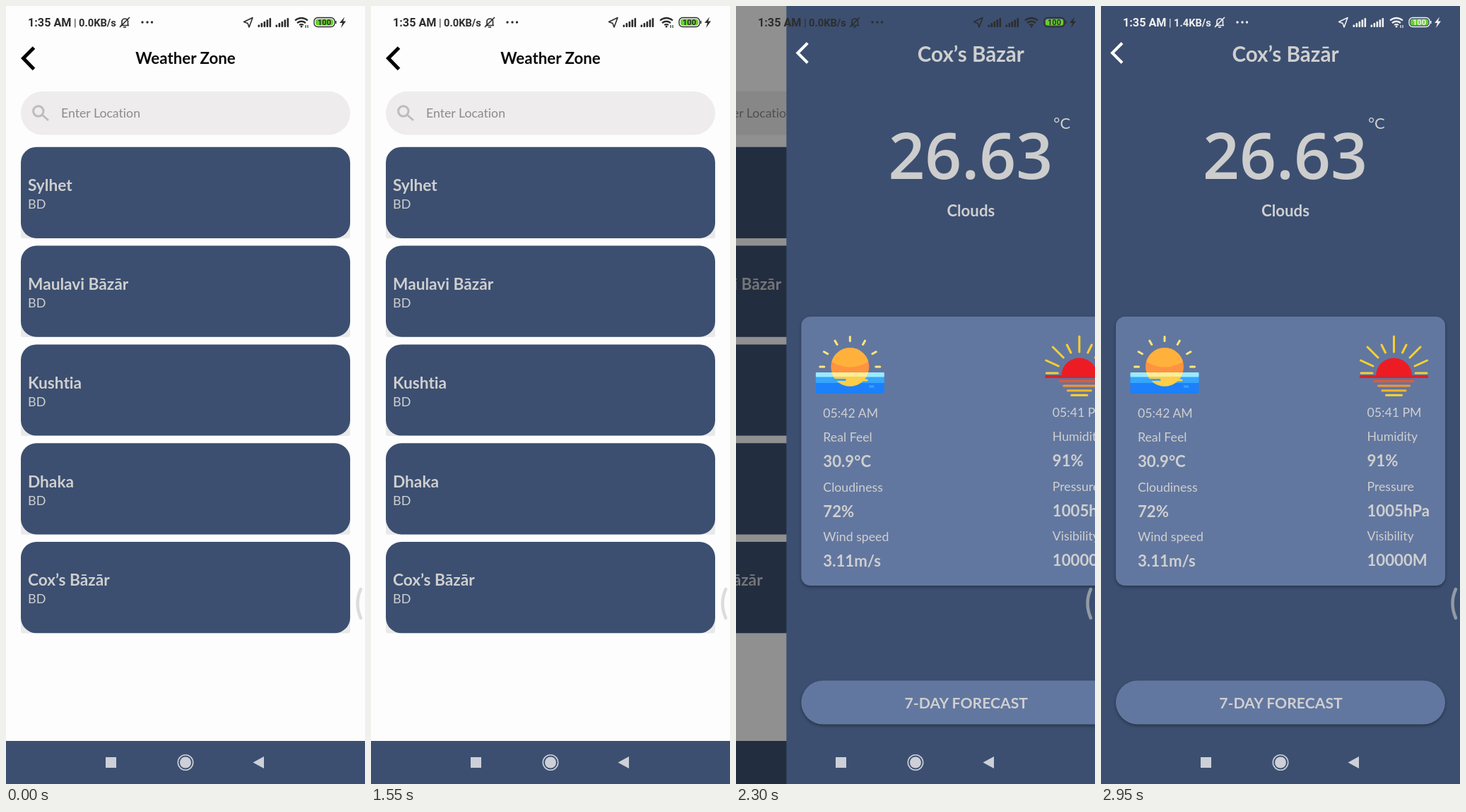
An HTML page for the animation above (3000 ms loop, 508 by 1102 pixels).

```html
<!DOCTYPE html>
<html lang="en">
<head>
<meta charset="utf-8">
<title>Weather</title>
<style>
html, body { margin: 0; width: 100%; height: 100%; overflow: hidden; background: #3c4f70; }
svg { display: block; width: 508px; height: 1102px; font-family: Lato, "Noto Sans", sans-serif; }
text { white-space: pre; font-variant-ligatures: none; }
.raised { filter: drop-shadow(0 2px 2px rgba(0, 0, 0, .35)); }
.status text { font-family: Roboto, sans-serif; }
</style>
</head>
<body>
<svg id="stage" viewBox="0 0 508 1102"></svg>
<script>
const LOOP = 3000, WIDTH = 508, NAVY = '#3c4f70', PANEL = '#62779f', PALE = '#cfcfd0';
const stage = document.getElementById('stage');

const text = (x, y, size, str, fill = PALE, weight = 400, extra = '') =>
  `<text x="${x}" y="${y}" font-size="${size}" fill="${fill}" font-weight="${weight}" ${extra}>${str}</text>`;
const rect = (x, y, w, h, fill, r = 0, extra = '') =>
  `<rect x="${x}" y="${y}" width="${w}" height="${h}" rx="${r}" fill="${fill}" ${extra}/>`;
const stroke = (d, color, width, extra = '') =>
  `<path d="${d}" fill="none" stroke="${color}" stroke-width="${width}" ${extra}/>`;
const middle = 'text-anchor="middle"', round = 'stroke-linecap="round"';

function listPage() {
  const cities = ['Sylhet', 'Maulavi Bāzār', 'Kushtia', 'Dhaka', 'Cox’s Bāzār'];
  const cards = cities.map((city, i) => {
    const y = 199.7 + i * 139.85;
    return rect(21, y + 95, 466, 34.5, '#e9e9ea', 3) + rect(21, y, 466, 129.2, NAVY, 22) +
      text(31, y + 62.3, 22.7, city, PALE, 700) + text(31, y + 87.3, 18, 'BD');
  });
  return rect(0, 0, WIDTH, 1102, '#fdfdfd') + rect(0, 1041, WIDTH, 61, NAVY) +
    stroke('M39.5 59 24.5 74 39.5 89.5', '#000', 5) +
    text(254, 82, 22.3, 'Weather Zone', '#0a0a0a', 700, middle) +
    rect(21, 121, 466, 61.5, '#eeecec', 30.7) +
    stroke('M53 149a7.2 7.2 0 1 1-14.4 0a7.2 7.2 0 1 1 14.4 0M51 154 60 162', '#bebcbc', 3) +
    text(78, 158, 17.7, 'Enter Location', '#8c8a8a') + cards.join('');
}

function sunrise() {
  let rays = '';
  for (let a = 0; a <= 180; a += 30) {
    const c = Math.cos(a * Math.PI / 180), s = Math.sin(a * Math.PI / 180);
    rays += `M${90 + 36.5 * c} ${511 - 36.5 * s}L${90 + 42.5 * c} ${511 - 42.5 * s}`;
  }
  return stroke(rays, '#ffe77c', 3, round) +
    '<circle cx="90" cy="511" r="27" fill="#ff9340"/>' +
    '<path d="M64 504a27 27 0 0 1 52 0q-26 15-52 0" fill="#ffb13c"/>' +
    rect(41.5, 519, 97, 30, '#1c80fa', 2) + rect(41.5, 525, 97, 9, '#36a5fb') +
    rect(41.5, 519, 97, 6.5, '#9aeaff', 1) +
    '<path d="M64 519h52a27 27 0 0 1-52 0" fill="#ffce48"/>' +
    '<path d="M64 519h52l-2.5 6h-47z" fill="#f8ee9c"/>' +
    stroke('M66 529.5H83', '#36a5fb', 3, round) +
    stroke('M97 530H114', '#ffce48', 3, round) +
    stroke('M117 539H124', '#36a5fb', 3);
}

function sunset() {
  const ripples = ['#f4562b', '#fb9330', '#fdb52d', '#fdd42f'];
  return stroke('M414.5 468V490M397 480 402.5 491M432 480 426.5 491M377 483 392 498M452 483 437 498' +
      'M367.5 502 385 510M461.5 502 444 510M368 520H384M445 520H461', '#fbd02d', 3, round) +
    '<path d="M389 524a25.5 25.5 0 0 1 51 0z" fill="#ed1c24"/>' +
    rect(366, 523, 97, 4, '#d9232c', 1) +
    ripples.map((c, i) => rect(385.5 + i * 5.5, 530 + i * 6.6, 58 - i * 11, 3, c, 1.5)).join('');
}

function detailContent() {
  const column = (x, y, rows) => rows.map((row, i) => {
    const bold = i > 0 && i % 2 === 0;
    return text(x, y + i * 35.2 - (i % 2), bold ? 22.2 : 17.7, row, PALE, bold ? 700 : 400);
  }).join('');
  return stroke('M30 52.5 16 66.5 30 80.5', '#fff', 4) +
    text(261, 79, 29.6, 'Cox’s Bāzār', PALE, 700, middle) +
    text(260.5, 245, 91, '26.63', '#cdcdcd', 600, middle + ' font-family="Open Sans, sans-serif"') +
    text(378, 174, 22, '°C') + text(261, 298, 22.2, 'Clouds', PALE, 700, middle) +
    rect(21, 440, 466, 381, PANEL, 13, 'class="raised"') + sunrise() + sunset() +
    column(52, 583, ['05:42 AM', 'Real Feel', '30.9°C', 'Cloudiness', '72%', 'Wind speed', '3.11m/s']) +
    column(376.5, 582, ['05:41 PM', 'Humidity', '91%', 'Pressure', '1005hPa', 'Visibility', '10000M']) +
    rect(21, 955.5, 466, 62, PANEL, 31, 'class="raised"') +
    text(254.5, 995, 21.2, '7-DAY FORECAST', PALE, 700, middle);
}

function statusBar() {
  const tint = 'currentColor';
  const signal = x => [0, 1, 2, 3, 4].map(i =>
    rect(x + i * 4, 26.5 - i * 2.4, 2.6, 3.5 + i * 2.4, tint, 1)).join('');
  return '<g id="status" class="status">' +
    text(31, 29, 16.2, '1:35 AM', tint, 600) + text(96, 29, 14.7, '|', tint) +
    text(103, 29, 14.7, '<tspan id="speed"></tspan>', tint, 600) +
    stroke('M162 27.5H174M164 27V21a4.5 4.5 0 0 1 8.5 0V27M166 30H170M161 30 175 16', tint, 1.6) +
    `<g id="dots">${[193, 200, 206.5].map(x => `<circle cx="${x}" cy="23" r="1.7" fill="${tint}"/>`).join('')}</g>` +
    stroke('M349 16.5 336.5 22.5 342 24.5 344 30z', tint, 1.6, 'stroke-linejoin="round"') +
    signal(356.5) + signal(381.5) +
    stroke('M409 20.5q9-7 18 0M412 24q6-4.5 12 0', tint, 2.2) +
    stroke('M415 27q3-2 6 0', tint, 2) + `<circle cx="418" cy="29" r="1.5" fill="${tint}"/>` +
    stroke('M424 27V31M427 27V31', tint, 1.2, 'id="traffic"') +
    rect(436, 16.5, 29, 13, 'none', 5, `stroke="${tint}" stroke-width="1.4"`) +
    rect(438, 18.5, 25, 9, '#66d02f', 3) + rect(466, 21, 1.5, 4, tint) +
    text(450.5, 27.2, 11, '100', tint, 700, middle) +
    `<path d="M479 15.5 472 24H476L474 31 481 21.5H477z" fill="${tint}"/></g>`;
}

function navigation() {
  const c = '#cdd0d8';
  return rect(141, 1064, 15, 15, c) + `<circle cx="254" cy="1071.5" r="8" fill="${c}"/>` +
    `<circle cx="254" cy="1071.5" r="10.7" fill="none" stroke="${c}" stroke-width="1.6"/>` +
    `<path d="M349.5 1071.5 365 1063V1080z" fill="${c}"/>`;
}

stage.innerHTML =
  `<g id="list">${listPage()}</g>` + rect(0, 0, WIDTH, 1102, '#000', 0, 'id="dim"') +
  '<circle id="touch" cx="203.5" cy="809.5" r="13.5" fill="#fff"/>' +
  `<g id="detail">${rect(0, 0, WIDTH, 1102, NAVY)}<g id="content">${detailContent()}</g></g>` +
  statusBar() + navigation() +
  stroke('M502 826Q493 846 502 867', 'rgba(200,200,200,.62)', 4.5, round);

const [list, dim, touch, detail, content, status, speed, dots, traffic] =
  ['list', 'dim', 'touch', 'detail', 'content', 'status', 'speed', 'dots', 'traffic']
    .map(id => document.getElementById(id));
const clamp = v => Math.max(0, Math.min(1, v));
const show = (el, on) => { el.style.display = on ? '' : 'none'; };

// Slightly underdamped spring for the page push
function push(ms) {
  if (ms <= 0) return 0;
  const damping = .87, u = 12.35 * ms / 1000, k = Math.sqrt(1 - damping * damping);
  return clamp(1 - Math.exp(-damping * u) * (Math.cos(k * u) + damping / k * Math.sin(k * u)));
}

function tone(p) {
  const v = Math.round(45 + 195 * p);
  return `rgb(${v},${v},${v})`;
}

function draw(now) {
  const t = now % LOOP, p = t > 2560 ? 1 : push(t - 2060.5);
  list.setAttribute('transform', `translate(${-WIDTH * p / 4} 0)`);
  detail.setAttribute('transform', `translate(${WIDTH * (1 - p)} 0)`);
  dim.setAttribute('opacity', p / 2);
  touch.setAttribute('opacity', t < 1950 ? 0 : .25 * clamp((2115 - t) / 70));
  show(content, t >= 2125); // the new page slides in blank at first
  status.style.color = tone(clamp((t - 2410) / 120));
  dots.style.color = tone(clamp((t - 2330) / 70));
  speed.textContent = t < 2800 ? '0.0KB/s' : '1.4KB/s';
  show(traffic, t < 600 || (t >= 1150 && t < 1700) || t >= 2800);
  requestAnimationFrame(() => draw(performance.now()));
}
draw(performance.now());
</script>
</body>
</html>
```
